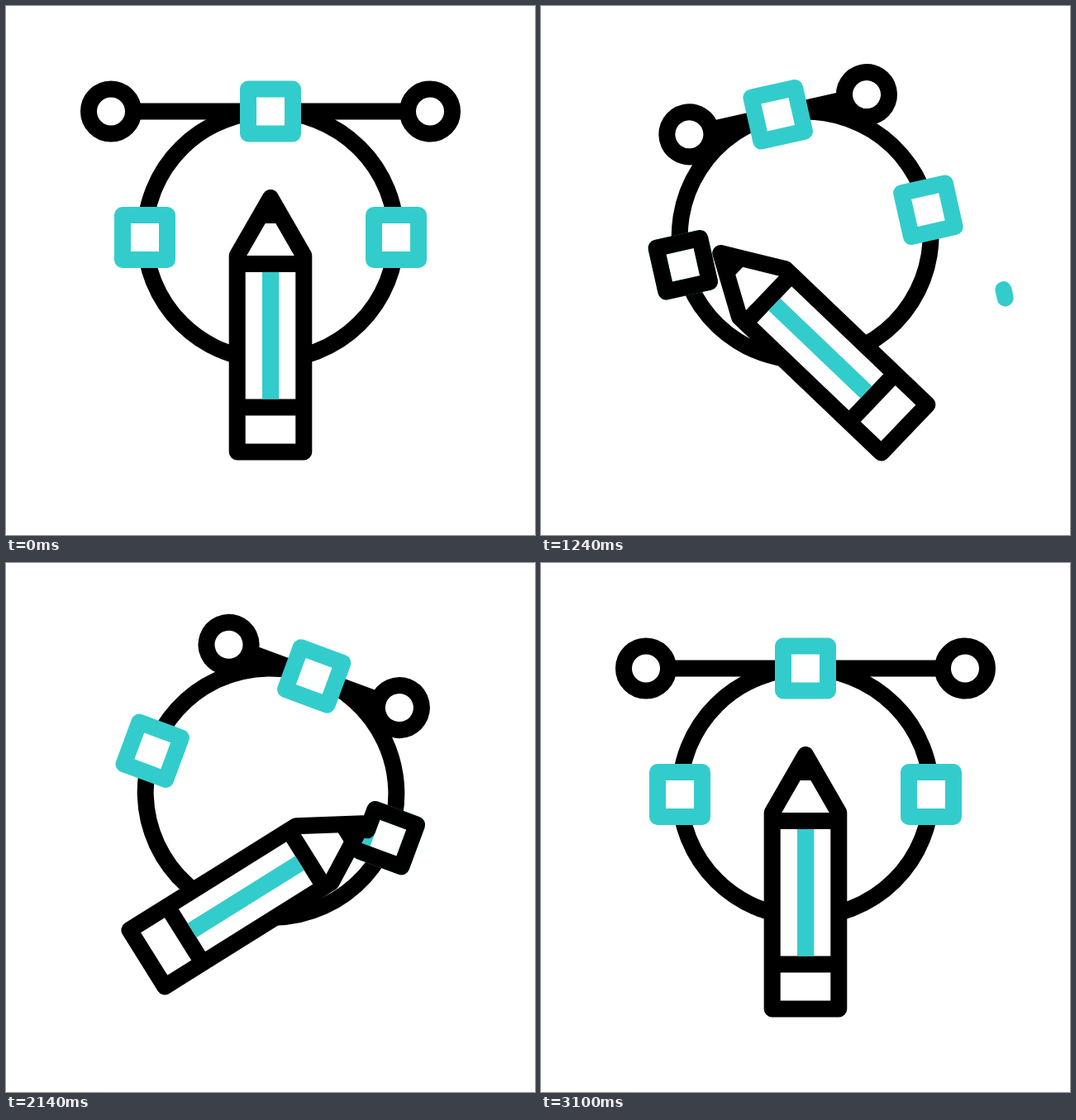
These frames come from a looping animation (640 px wide and 640 px high, 3220 ms). An HTML page:

```html
<!DOCTYPE html>
<html lang="en">
<head>
<meta charset="utf-8">
<title>Vector pen</title>
<style>
  html, body { margin: 0; width: 100%; height: 100%; overflow: hidden; background: #fff; }
  svg { display: block; width: 100vw; height: 100vh; }
  .line { fill: none; stroke: #000; stroke-width: 20; stroke-linecap: round; stroke-linejoin: round; }
  .teal { stroke: #33cccc; }
  .white { fill: #fff; }
</style>
</head>
<body>
<svg viewBox="0 0 640 640">
  <path id="swooshL" class="line teal" pathLength="1"/>
  <path id="swooshR" class="line teal" pathLength="1"/>
  <g id="rig">
    <ellipse class="line" cy="-1.5" rx="152" ry="150.5"/>
    <path id="bar" class="line"/>
    <circle id="knobL" class="line white" cy="-152" r="27"/>
    <circle id="knobR" class="line white" cy="-152" r="27"/>
    <g id="nodes"></g>
    <g id="pencil">
      <path class="line white" d="M0 -18L40.3 52V289.5H-40.3V52Z"/>
      <path d="M0 -18L18 13H-18Z"/>
      <path class="line" d="M-40 62H40M-40 235.5H40"/>
      <path fill="#33cccc" d="M-10 72H10.3V225.5H-10Z"/>
    </g>
  </g>
</svg>
<script>
const LOOP = 3220;
const ORBIT = 152;
const $ = id => document.getElementById(id);
const set = (el, name, value) => el.setAttribute(name, value);

// Eased progress from 0 to 1 between two times
function ramp(t, from, to) {
  const p = Math.min(1, Math.max(0, (t - from) / (to - from)));
  return (1 - Math.cos(Math.PI * p)) / 2;
}

// Shows the part of a path between two fractions of its length
function trim(path, start, end) {
  const shown = end > start;
  path.style.visibility = shown ? "visible" : "hidden";
  if (!shown) return;
  set(path, "stroke-dasharray", `${end - start} 2`);
  set(path, "stroke-dashoffset", -start);
}

// Draws a path from its start, then wipes it the same way
function sweep(path, t, begin) {
  trim(path, ramp(t, begin + 300, begin + 590), ramp(t, begin, begin + 300));
}

function arc(cx, cy, from, to) {
  const r = 104;
  const at = deg => {
    const a = deg * Math.PI / 180;
    return `${cx + r * Math.cos(a)} ${cy + r * Math.sin(a)}`;
  };
  return `M${at(from)}A${r} ${r} 0 0 ${to > from ? 1 : 0} ${at(to)}`;
}
set($("swooshL"), "d", arc(225, 446, 195, 65));
set($("swooshR"), "d", arc(459, 370, -15, 115));

// A square node on the orbit, returning the outline that is traced over it
function addNode(x, y) {
  const square = "M-27 27H27V-27H-27Z";
  $("nodes").insertAdjacentHTML("beforeend", `<g transform="translate(${x} ${y})">
    <path class="line teal white" d="${square}"/>
    <path class="line" pathLength="1" d="${square}"/></g>`);
  return $("nodes").lastElementChild.lastElementChild;
}
const top_ = addNode(0, -ORBIT);
const left = addNode(-ORBIT, 0.5);
const right = addNode(ORBIT, 0.5);

function draw(t) {
  const tilt = -26.7 * ramp(t, 220, 820) + 50.7 * ramp(t, 860, 1940) - 24 * ramp(t, 1940, 2720);
  set($("rig"), "transform", `translate(320 279.5) rotate(${tilt})`);

  const half = 193 - 83 * (ramp(t, 220, 600) - ramp(t, 2490, 2900));
  set($("knobL"), "cx", -half);
  set($("knobR"), "cx", half);
  set($("bar"), "d", `M${-half} ${-ORBIT}H${half}`);

  // The pencil visits the top, left and right nodes, then goes home
  const toTop = ramp(t, 220, 520);
  const toLeft = ramp(t, 640, 960);
  const toRight = ramp(t, 1090, 1920);
  const toHome = ramp(t, 2020, 2810);
  const lean = 2 * toRight - toLeft - toHome;
  const y = -29.5 - 70.5 * toTop + 111.5 * toLeft - 41 * toHome;
  set($("pencil"), "transform", `translate(${112.4 * lean} ${y}) rotate(${40 * lean})`);

  sweep(top_, t, 510);
  sweep(left, t, 960);
  sweep(right, t, 1910);
  sweep($("swooshL"), t, 220);
  sweep($("swooshR"), t, 1200);
}

const begun = performance.now();
function tick() {
  draw((performance.now() - begun) % LOOP);
  requestAnimationFrame(tick);
}
tick();
</script>
</body>
</html>
```
